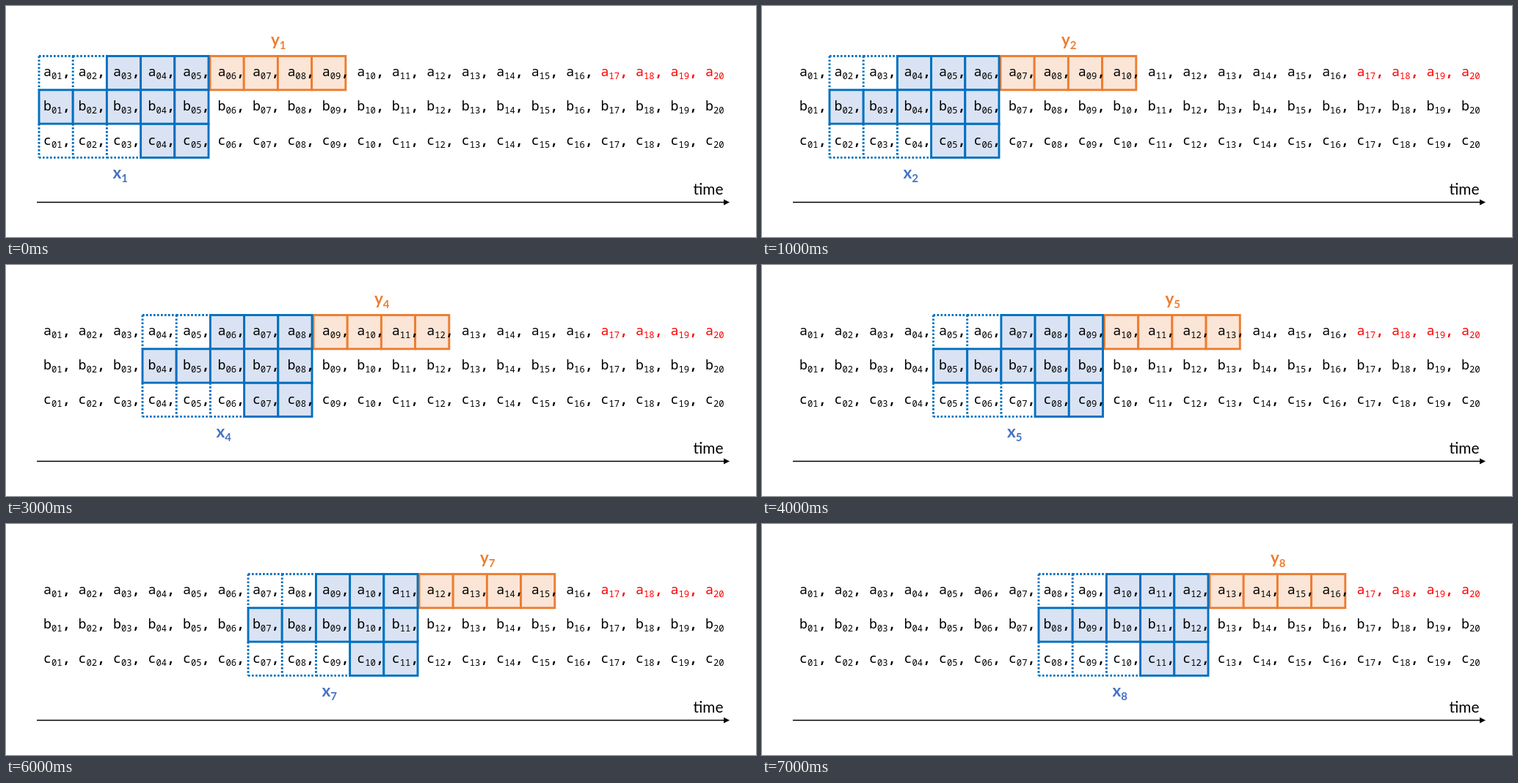
An HTML page with a canvas that plays this animation: 1022x316 px, repeating every 8 s.

```html
<!DOCTYPE html>
<html lang="en">
<head>
<meta charset="utf-8">
<title>Sliding time windows</title>
<style>
  html, body { margin: 0; width: 100%; height: 100%; overflow: hidden; background: #fff; }
  canvas { display: block; }
</style>
</head>
<body>
<canvas id="stage" width="1022" height="316"></canvas>
<script>
const ctx = document.getElementById('stage').getContext('2d');

const STEP_MS = 1000;
const WINDOW_X = [45, 92, 138.5, 186, 233.5, 282, 330, 377];
const CELL = 46.2, TOP = 68.5, ROW = 46.3;
const PITCH = 47.47, ADVANCE = 10.95;
const BLUE = '#0070c0', BLUE_FILL = '#dae3f3', BLUE_TEXT = '#4472c4';
const ORANGE = '#ed7d31', ORANGE_FILL = '#fbe5d6';
const MONO = '"Noto Sans Mono", monospace';
const SANS = 'Lato, sans-serif';

function write(str, x, y, font, color) {
  ctx.font = font;
  ctx.fillStyle = color;
  ctx.fillText(str, x, y);
}

function cells(x, row, first, last, stroke, fill) {
  ctx.strokeStyle = stroke;
  ctx.lineWidth = 2.9;
  ctx.setLineDash(fill ? [] : [2.6, 2.4]);
  for (let i = first; i < last; i++) {
    const box = [x + i * CELL, TOP + row * ROW, CELL, ROW];
    if (fill) {
      ctx.fillStyle = fill;
      ctx.fillRect(...box);
      ctx.strokeRect(...box);
    } else {
      // Open cells: left edge plus the outer horizontal edge.
      const edge = row === 0 ? box[1] : box[1] + ROW;
      ctx.beginPath();
      ctx.moveTo(box[0], box[1]);
      ctx.lineTo(box[0], box[1] + ROW);
      ctx.moveTo(box[0], edge);
      ctx.lineTo(box[0] + CELL, edge);
      ctx.stroke();
    }
  }
  ctx.setLineDash([]);
}

function series(letter, row) {
  const y = 96 + row * 47;
  for (let i = 1; i <= 20; i++) {
    const x = 51.1 + (i - 1) * PITCH;
    const color = row === 0 && i > 16 ? '#ff0000' : '#000';
    write(letter, x, y, '18.25px ' + MONO, color);
    write(String(i).padStart(2, '0'), x + ADVANCE, y + 4, '12.17px ' + MONO, color);
    if (i < 20) write(',', x + ADVANCE * 7 / 3, y, '600 18.25px ' + MONO, color);
  }
}

function label(letter, index, x, y, color) {
  write(letter, x, y, 'bold 22.5px ' + SANS, color);
  const width = ctx.measureText(letter).width;
  write(index, x + width, y + 5, 'bold 15px ' + SANS, color);
}

function timeAxis() {
  ctx.strokeStyle = ctx.fillStyle = '#000';
  ctx.lineWidth = 1.5;
  ctx.beginPath();
  ctx.moveTo(42, 268.4);
  ctx.lineTo(979, 268.4);
  ctx.stroke();
  ctx.beginPath();
  ctx.moveTo(978, 264.4);
  ctx.lineTo(986, 268.4);
  ctx.lineTo(978, 272.4);
  ctx.fill();
  write('time', 936.5, 258, '20.8px ' + SANS, '#000');
}

function draw(now) {
  const step = Math.floor(now / STEP_MS) % WINDOW_X.length;
  const x = WINDOW_X[step];
  ctx.fillStyle = '#fff';
  ctx.fillRect(0, 0, 1022, 316);

  cells(x, 0, 0, 2, BLUE);
  cells(x, 2, 0, 3, BLUE);
  cells(x + 233 - 4 * CELL, 0, 4, 8, ORANGE, ORANGE_FILL);
  cells(x, 0, 2, 5, BLUE, BLUE_FILL);
  cells(x, 2, 3, 5, BLUE, BLUE_FILL);
  cells(x, 1, 0, 5, BLUE, BLUE_FILL);

  ['a', 'b', 'c'].forEach(series);
  label('x', step + 1, x + 100.6, 236, BLUE_TEXT);
  label('y', step + 1, x + 316, 54, ORANGE);
  timeAxis();
}

const start = performance.now();
function tick() {
  draw(performance.now() - start);
  requestAnimationFrame(tick);
}
tick();
</script>
</body>
</html>
```
